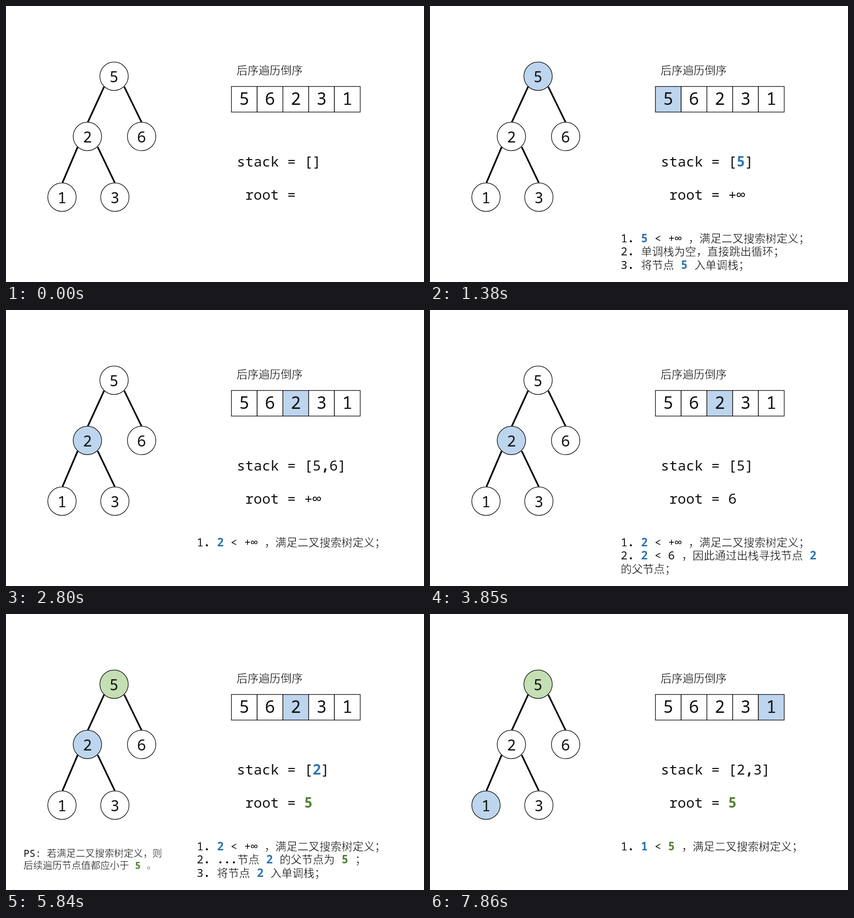
Write an HTML page that moves like this. It is 834 px wide and 550 px high and loops after 8 s.

```html
<!DOCTYPE html>
<html lang="zh-CN">
<head>
<meta charset="utf-8">
<title>后序遍历</title>
<style>
html, body { margin: 0; width: 100%; height: 100%; overflow: hidden; background: #fff; }
svg { display: block; width: 834px; height: 550px; }
text { white-space: pre; fill: #111; font-family: "Noto Sans Mono", "DejaVu Sans Mono", monospace; }
/* The white outline thins the Chinese strokes. */
.cjk { font-family: "Noto Sans CJK SC", "Noto Sans CJK", sans-serif; stroke: #fff; stroke-width: .4; }
.blue { fill: #2e75b6; font-weight: 700; }
.green { fill: #548235; font-weight: 700; }
.dot { font-weight: 700; }
.mid { text-anchor: middle; }
.shape { fill: #fff; stroke: #111; stroke-width: 1.3; }
.edge { stroke: #000; stroke-width: 3.2; }
</style>
</head>
<body>
<svg id="stage" viewBox="0 0 834 550"></svg>
<script>
const LOOP = 8000;
const BLUE = '#bdd5ed', GREEN = '#c4dfb3';

// value: [x, y]
const nodes = { 5: [215.6, 140], 2: [162.4, 260], 6: [270.6, 260], 1: [111.7, 381], 3: [217.2, 381] };
const edges = [[195.7, 161, 163.3, 231.5], [236, 161, 270.5, 231.5], [143, 281, 112.7, 352], [183, 281, 217, 352]];
const order = [5, 6, 2, 3, 1];

// In text, ^ marks a blue digit and _ a green one.
const DEFINED = ' ，满足二叉搜索树定义；';
const twoDefined = '1. ^2 < +∞' + DEFINED;
const push = v => `3. 将节点 ^${v} 入单调栈；`;
const note = ['PS: 若满足二叉搜索树定义，则', '后续遍历节点值都应小于 _5 。'];

const scenes = [
  { at: 0, stack: '', root: '', lines: [] },
  { at: 810, now: 5, stack: '^5', root: '+∞',
    lines: ['1. ^5 < +∞' + DEFINED, '2. 单调栈为空，直接跳出循环；', push(5)] },
  { at: 1820, now: 6, stack: '5,^6', root: '+∞',
    lines: ['1. ^6 < +∞' + DEFINED, '2. 5 < ^6 ，因此直接跳出循环；', push(6)] },
  { at: 2800, now: 2, stack: '5,6', root: '+∞', lines: [twoDefined] },
  { at: 3850, now: 2, stack: '5', root: '6',
    lines: [twoDefined, '2. ^2 < 6 ，因此通过出栈寻找节点 ^2', '的父节点；'] },
  { at: 4780, now: 2, parent: 5, stack: '', root: '_5', note,
    lines: [twoDefined, '2. ^2 < 5 ，因此继续出栈，单调栈为', '空，节点 ^2 的父节点为 _5 ；'] },
  { at: 5800, now: 2, parent: 5, stack: '^2', root: '_5', note,
    lines: [twoDefined, '2. ...节点 ^2 的父节点为 _5 ；', push(2)] },
  { at: 6810, now: 3, parent: 5, stack: '2,^3', root: '_5',
    lines: ['1. ^3 < _5' + DEFINED, '2. 2 < ^3 ，因此直接跳出循环；', push(3)] },
  { at: 7780, now: 1, parent: 5, stack: '2,3', root: '_5', lines: ['1. ^1 < _5' + DEFINED] }
];

// Latin runs advance 0.6 em, Chinese runs one em of their own size.
function label(str, x, y, size, cjkSize = size) {
  const runs = str.match(/[\^_]\d|[.,]+|[ -+\-\/-\]`-~∞]+|[^ -~∞]+/g) || [];
  return runs.map(run => {
    const cjk = /^[^ -~∞]/.test(run);
    const mark = { '^': 'blue', '_': 'green' }[run[0]];
    const body = mark ? run.slice(1) : run;
    const em = cjk ? cjkSize : size;
    const cls = cjk ? 'cjk' : mark || (/^[.,]/.test(run) ? 'dot' : '');
    const out = `<text class="${cls}" x="${x}" y="${y}" font-size="${em}">${body.replace(/</g, '&lt;')}</text>`;
    x += body.length * em * (cjk ? 1 : 0.6);
    return out;
  }).join('');
}

const digit = (v, x, y, size) => `<text class="mid" x="${x}" y="${y}" font-size="${size}">${v}</text>`;

function tree(s) {
  const lines = edges.map(([a, b, c, d]) => `<line class="edge" x1="${a}" y1="${b}" x2="${c}" y2="${d}"/>`);
  const discs = Object.entries(nodes).map(([v, [x, y]]) => {
    const fill = v == s.now ? BLUE : v == s.parent ? GREEN : '#fff';
    return `<circle class="shape" style="fill:${fill}" cx="${x}" cy="${y}" r="28.3"/>` + digit(v, x, y + 11.5, 30);
  });
  return lines.concat(discs).join('');
}

function cells(s) {
  const w = 51.4;
  return order.map((v, i) => {
    const x = 449.7 + i * w;
    return `<rect class="shape" style="fill:${v === s.now ? BLUE : '#fff'}" x="${x}" y="160.4" width="${w}" height="51"/>`
      + digit(v, x + w / 2, 196.7, 34);
  }).join('');
}

function draw(s) {
  return tree(s) + cells(s)
    + label('后序遍历倒序', 460, 136.3, 22)
    + label(`stack = [${s.stack}]`, 460.5, 320, 28)
    + label(`root = ${s.root}`, 477.3, 386, 28)
    + s.lines.map((t, i) => label(t, 380.5, 471 + i * 26.4, 22.5, 22)).join('')
    + (s.note || []).map((t, i) => label(t, 35, 484 + i * 24, 19.5, 19.15)).join('');
}

const stage = document.getElementById('stage');
let shown;
function tick() {
  const t = performance.now() % LOOP;
  const scene = scenes.filter(s => s.at <= t).pop();
  if (scene !== shown) {
    stage.innerHTML = draw(scene);
    shown = scene;
  }
  requestAnimationFrame(tick);
}
tick();
</script>
</body>
</html>
```
